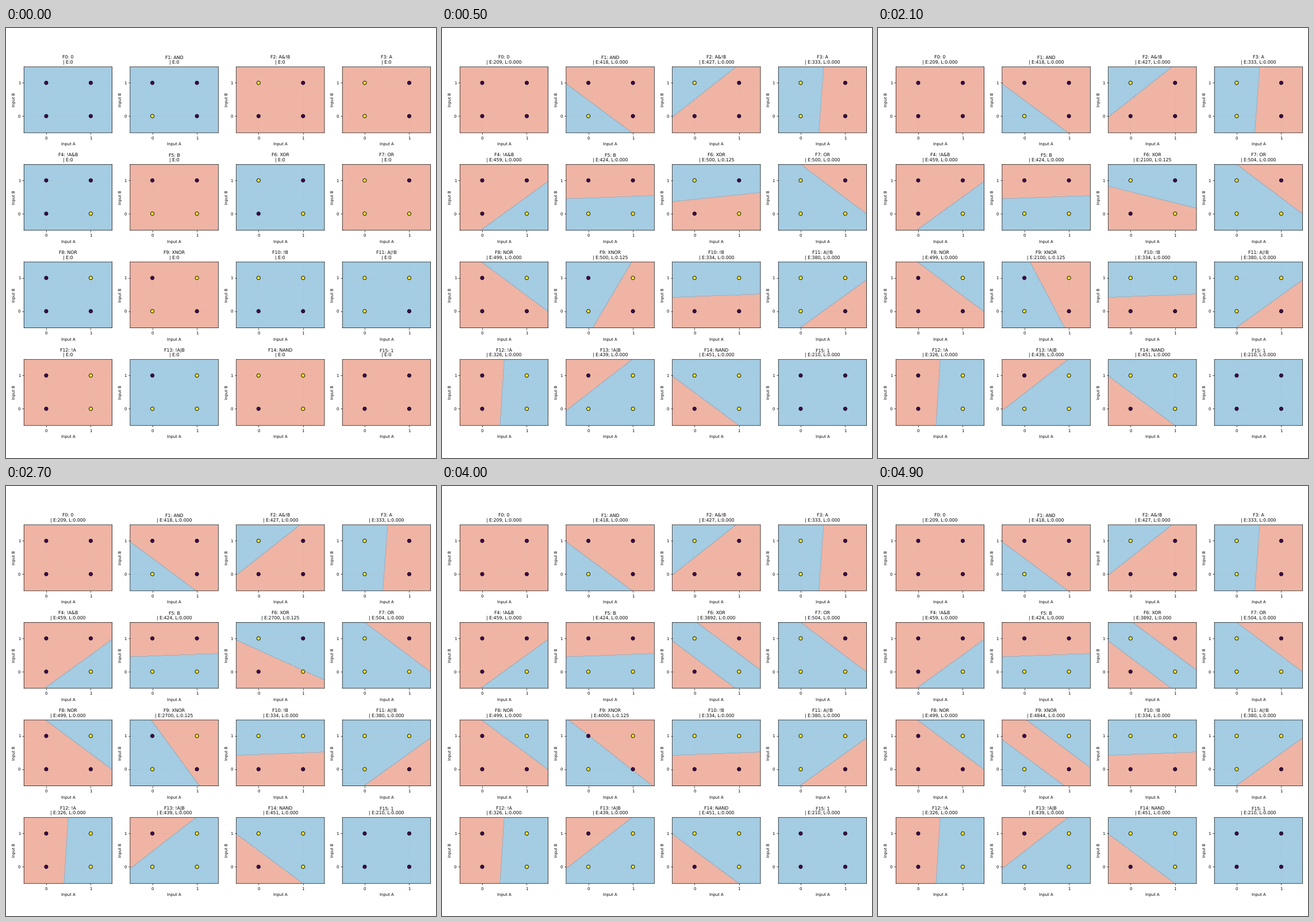
Animation, 748 px wide and 748 px high, one loop 5000 ms. Source, as a matplotlib script:

```python
import numpy as np
import matplotlib.pyplot as plt
from matplotlib.animation import FuncAnimation

SIZE, INCHES = 748, 12
FRAMES, INTERVAL = 50, 100
EPOCHS_PER_FRAME = 100
LO, HI = -0.5, 1.48

# Panel geometry in pixels, measured from the top left corner.
LEFT, TOP = 31.2, 67.6
WIDTH, HEIGHT = 153.46, 114.6
PITCH_X, PITCH_Y = 184.66, 169.7

NAMES = ["0", "AND", "A&!B", "A", "!A&B", "B", "XOR", "OR",
         "NOR", "XNOR", "!B", "A|!B", "!A", "!A|B", "NAND", "1"]
CONVERGED = [209, 418, 427, 333, 459, 424, 3892, 504,
             499, 4844, 334, 380, 326, 439, 451, 210]
STARTS_HIGH = {0, 1, 4, 6, 8, 10, 11, 13}

# Decision line of each separable gate; the high side lies to the left.
LINES = {
    1: ((0.98, LO), (LO, 0.973)),
    2: ((LO, -0.03), (0.93, HI)),
    3: ((0.41, LO), (0.52, HI)),
    4: ((HI, 0.97), (-0.035, LO)),
    5: ((HI, 0.543), (LO, 0.448)),
    7: ((HI, -0.01), (0.003, HI)),
    8: ((-0.015, HI), (HI, -0.01)),
    10: ((LO, 0.42), (HI, 0.52)),
    11: ((-0.02, LO), (HI, 0.945)),
    12: ((0.49, HI), (0.395, LO)),
    13: ((0.98, HI), (LO, -0.057)),
    14: ((LO, 0.988), (0.995, LO)),
}

# The two non-separable gates: epoch at half loss and the turning first line.
HALF_LOSS = {6: 3400, 9: 4352}
XOR_TIMES = [100, 500, 1200, 2100, 3200, 3600]
XOR_LEFT = [0.256, 0.36, 0.541, 0.826, 1.06, 0.93]
XOR_RIGHT = [0.74, 0.636, 0.455, 0.162, -0.595, -1.07]
XNOR_TIMES = [100, 500, 1200, 2100, 3200, 4000, 4200, 4560]
XNOR_BOTTOM = [-0.2, 0.096, 0.643, 0.907, 1.183, 1.44, 1.40, 0.90]
XNOR_TOP = [1.3, 0.971, 0.386, 0.128, -0.155, -0.44, -0.50, -1.09]

axis_values = np.linspace(LO, HI, 100)
X, Y = np.meshgrid(axis_values, axis_values)


def signed_distance(p, q):
    dx, dy = q[0] - p[0], q[1] - p[1]
    return (dx * (Y - p[1]) - dy * (X - p[0])) / np.hypot(dx, dy)


def split_progress(gate, epoch):
    return 1 / (1 + np.exp((HALF_LOSS[gate] - epoch) / 60))


def field(gate, epoch):
    """Network output over the plane; 0.5 is the decision boundary."""
    if gate in (0, 15):
        d = np.full_like(X, -1.0 if gate == 0 else 1.0)
    elif gate in HALF_LOSS:
        second = (X + Y - 3.2 + 1.67 * split_progress(gate, epoch)) / np.sqrt(2)
        if gate == 6:
            left = np.interp(epoch, XOR_TIMES, XOR_LEFT)
            right = np.interp(epoch, XOR_TIMES, XOR_RIGHT)
            d = np.minimum(signed_distance((LO, left), (HI, right)), -second)
        else:
            bottom = np.interp(epoch, XNOR_TIMES, XNOR_BOTTOM)
            top = np.interp(epoch, XNOR_TIMES, XNOR_TOP)
            d = np.maximum(signed_distance((bottom, LO), (top, HI)), second)
    else:
        d = signed_distance(*LINES[gate])
    bias = 2.5 * np.exp(-epoch / 50)
    return 0.5 + 0.1 * (d + (bias if gate in STARTS_HIGH else -bias))


def loss(gate, epoch):
    if gate in HALF_LOSS:
        return 0.125 * (1 - split_progress(gate, epoch))
    return 0.12 * np.exp(-7 * (epoch / CONVERGED[gate]) ** 1.2)


class Panel:
    def __init__(self, fig, gate):
        row, col = divmod(gate, 4)
        left, top = LEFT + PITCH_X * col, TOP + PITCH_Y * row
        self.gate, self.epoch, self.regions = gate, None, None
        self.ax = ax = fig.add_axes([left / SIZE, 1 - (top + HEIGHT) / SIZE,
                                     WIDTH / SIZE, HEIGHT / SIZE])
        ax.set(xlim=(LO, HI), ylim=(LO, HI), xticks=[0, 1], yticks=[0, 1])
        ax.set_xlabel("Input A", fontsize=8)
        ax.set_ylabel("Input B", fontsize=8)
        ax.tick_params(labelsize=8)
        ax.grid(True, linestyle=":", alpha=0.3)
        for spine in ax.spines.values():
            spine.set_snap(False)
        a, b = [0, 0, 1, 1], [0, 1, 0, 1]
        bits = [gate >> i & 1 for i in range(4)]
        if gate == 15:
            bits = [0] * 4  # a constant target maps to the lowest colour
        ax.scatter(a, b, c=bits, cmap="viridis", vmin=0, vmax=1, s=50,
                   edgecolors="black", linewidths=1, zorder=3)
        self.title = ax.set_title("", fontsize=9, linespacing=1.05)

    def show(self, epoch):
        epoch = min(epoch, CONVERGED[self.gate])
        if epoch == self.epoch:
            return
        self.epoch = epoch
        if self.regions is not None:
            self.regions.remove()
        self.regions = self.ax.contourf(X, Y, field(self.gate, epoch),
                                        levels=[0, 0.5, 1], cmap="RdBu",
                                        alpha=0.6)
        text = f"F{self.gate}: {NAMES[self.gate]}\n| E:{epoch}"
        if epoch:
            text += f", L:{loss(self.gate, epoch):.3f}"
        self.title.set_text(text)


plt.rcParams.update({"font.family": "DejaVu Sans", "text.hinting": "none"})
side = INCHES + 1e-6
fig = plt.figure(figsize=(side, side), dpi=SIZE / INCHES, facecolor="white")
panels = [Panel(fig, gate) for gate in range(16)]


def update(frame):
    for panel in panels:
        panel.show(frame * EPOCHS_PER_FRAME)
    return []


anim = FuncAnimation(fig, update, frames=FRAMES, interval=INTERVAL,
                     init_func=lambda: update(0), repeat=True, repeat_delay=0)
plt.show()
```
